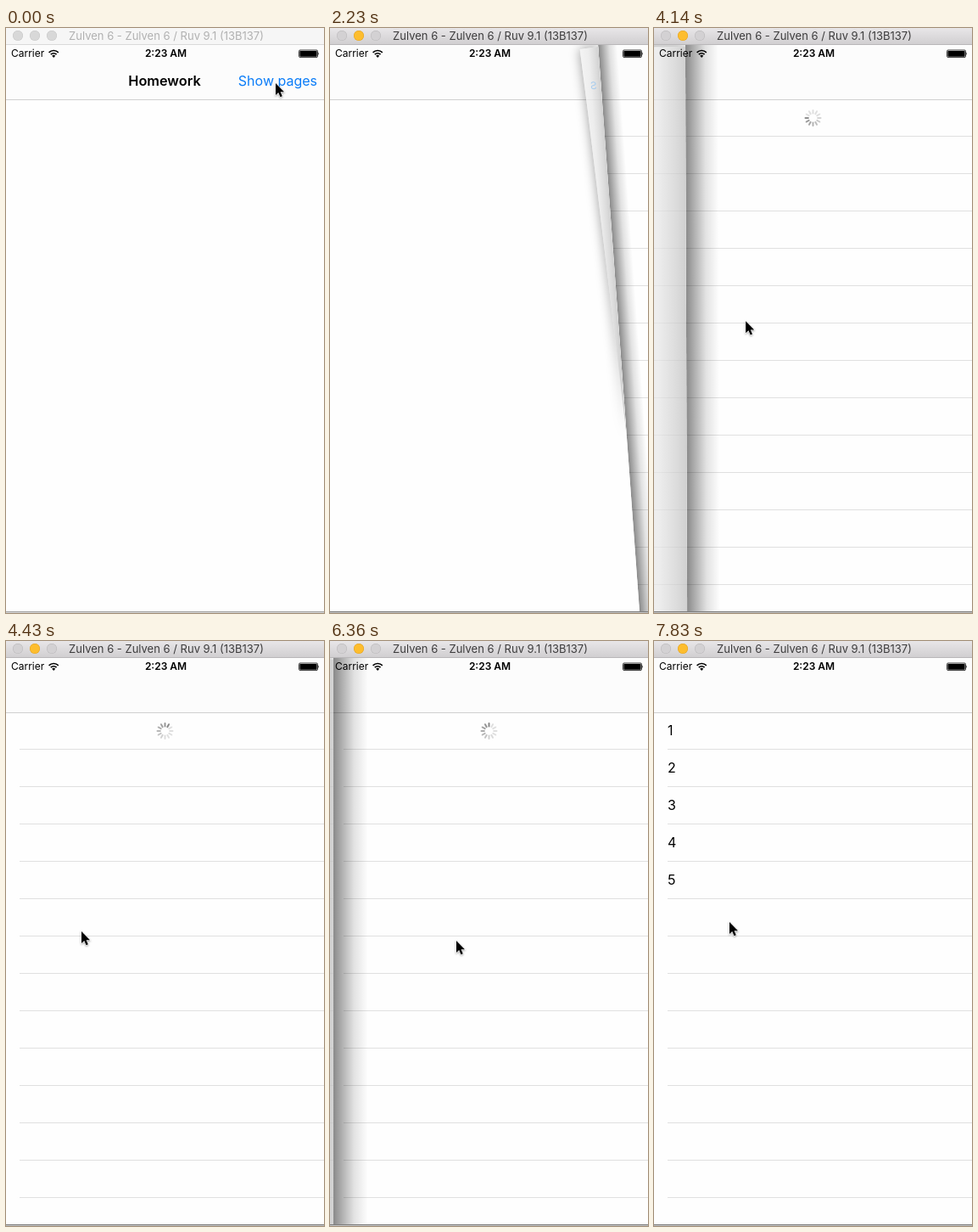
An HTML page with a canvas for the animation above (8 s loop, 375 by 689 pixels).

```html
<!DOCTYPE html>
<html lang="en">
<head>
<meta charset="utf-8">
<title>Homework pages</title>
<style>
html, body { margin: 0; width: 100%; height: 100%; overflow: hidden; background: #fdfdfd; }
body { position: relative; font-family: Inter, "Open Sans", sans-serif; color: #000; }
#stage { position: absolute; left: 0; top: 0; width: 375px; height: 689px; overflow: hidden; }
canvas, #cursor { position: absolute; left: 0; top: 0; }
canvas { width: 375px; height: 689px; }
#bar { position: absolute; left: 0; top: 0; width: 375px; height: 19px; background: #f6f6f6;
  border-bottom: 1px solid #dadada; color: #b1b1b1; font-size: 13px; line-height: 19px; }
#bar span { position: absolute; left: 0; width: 378px; text-align: center; white-space: pre; }
#bar i { position: absolute; top: 3px; width: 12px; height: 12px; border-radius: 50%;
  background: #d8d8d8; box-shadow: inset 0 0 0 .5px #c6c6c6; }
#bar.on { background: linear-gradient(#e8e6e8, #d1cfd1); border-color: #b9b7b9; color: #3d3c3d; }
#bar.on i { background: #d3d1d3; box-shadow: inset 0 0 0 .5px #b9b7b9; }
#bar.on i.mid { background: #fdbd2e; box-shadow: inset 0 0 0 .5px #dfa023; }
#nav { position: absolute; left: 0; top: 20px; width: 375px; height: 64px; overflow: hidden; line-height: 20px; }
#nav b, #nav span { position: absolute; top: 32px; white-space: nowrap; }
#nav b { left: 0; width: 374px; text-align: center; font-size: 16.3px; font-weight: 600; }
#nav span { right: 8px; font-size: 16px; color: #0a7cf8; }
#status { position: absolute; left: 0; top: 20px; width: 375px; height: 20px; font-size: 12px; line-height: 20px; }
#status span { position: absolute; left: 6px; }
#status b { position: absolute; left: 0; width: 377px; text-align: center; font-weight: 600; }
#status svg { position: absolute; left: 0; top: 0; }
</style>
</head>
<body>
<div id="stage">
  <canvas id="view"></canvas>
  <div id="nav"><b>Homework</b><span>Show pages</span></div>
  <div id="status">
    <span>Carrier</span><b>2:23 AM</b>
    <svg width="375" height="20">
      <g fill="none" stroke="#000" stroke-width="1.7">
        <path d="M50.6 8.8a8 8 0 0 1 11.2 0M52.8 11.2a4.9 4.9 0 0 1 6.8 0"/>
      </g>
      <path d="M56.2 15l-2-2.2a2.9 2.9 0 0 1 4 0z"/>
      <rect x="345.5" y="6" width="22" height="8.6" rx="1.4" fill="none" stroke="#000" stroke-width=".8"/>
      <rect x="346.4" y="6.9" width="20.2" height="6.8" rx=".6"/>
      <path d="M368.4 8.6q1.4 1.6 0 3.4z"/>
    </svg>
  </div>
  <div id="bar"><i style="left:8px"></i><i class="mid" style="left:28px"></i><i style="left:48px"></i>
    <span>Zulven 6 - Zulven 6 / Ruv 9.1 (13B137)</span></div>
  <svg id="cursor" width="18" height="22" viewBox="-2 -2 18 22" style="filter:drop-shadow(0 1px 1px rgba(0,0,0,.35))">
    <path d="M0 0V14L3.2 11L5.5 16.2L7.8 15.2L5.6 10.2H10z" fill="#000" stroke="#fff" stroke-width="1.1" paint-order="stroke"/>
  </svg>
</div>
<script>
const LOOP = 8000, W = 375, TOP = 20, NAV = 84, END = 687, ROW = 44;
const $ = id => document.getElementById(id);
const canvas = $('view'), ctx = canvas.getContext('2d');
const scale = window.devicePixelRatio || 1;
canvas.width = W * scale;
canvas.height = 689 * scale;

const clamp = (v, a = 0, b = 1) => Math.min(b, Math.max(a, v));
const easeOut = u => 1 - (1 - clamp(u)) ** 2;

// time, tip x, tip y
const pointer = [
  [0, 318, 65], [2080, 318, 65], [2600, 312, 300], [3100, 307, 376], [3254, 307, 376], [3400, 300, 374],
  [3850, 170, 352], [4150, 105, 345], [4425, 89, 342], [4700, 92, 343],
  [5250, 285, 361], [5500, 297, 363], [5640, 297, 363], [5800, 288, 362],
  [6100, 190, 356], [6337, 149, 353], [6650, 118, 361], [7200, 92, 338], [7600, 89, 331]
];

// time, fold x at the top, fold x at the bottom
const curls = [
  [[2060, 375, 376], [2080, 362, 375], [2227, 316, 365], [2400, 240, 310], [2600, 120, 190], [2800, 40, 70], [2960, -20, 0], [3080, -70, -60]],
  [[3390, 375, 375], [3550, 330, 338], [3850, 170, 176], [4150, 30, 32], [4300, -50, -50]],
  [[5650, 375, 375], [5790, 340, 344], [6050, 190, 194], [6337, 4, 4], [6480, -60, -60]]
];

const pages = [
  { blank: true },
  { count: 0, load: Infinity },
  { count: 2, load: 5366 },
  { count: 5, load: 7440 }
];

function at(track, t) {
  if (t <= track[0][0]) return track[0].slice(1);
  for (let i = 1; i < track.length; i++) {
    const a = track[i - 1], b = track[i];
    if (t < b[0]) {
      const u = (t - a[0]) / (b[0] - a[0]);
      return [1, 2].map(k => a[k] + (b[k] - a[k]) * u);
    }
  }
  return track[track.length - 1].slice(1);
}

function tick(t) {
  if (t < 900) return 0;
  if (t < 2080) return 900 + 147 * Math.min(5, Math.floor((t - 900) / 147));
  return 2080 + 146.8 * Math.min(39, Math.floor((t - 2080) / 146.8));
}

function box(x, y, w, h, fill) {
  ctx.fillStyle = fill;
  ctx.fillRect(x, y, w, h);
}

const line = (y, h = 1) => box(16, Math.round(y), W - 16, h, '#e0e0e0');

function spinner(y, t) {
  ctx.save();
  ctx.translate(187.5, y);
  ctx.lineWidth = 2;
  ctx.lineCap = 'round';
  const head = t * 0.36 - 118;
  for (let i = 0; i < 12; i++) {
    const behind = (((head - i * 30) % 360) + 360) % 360 / 360;
    const a = i * Math.PI / 6, s = Math.sin(a), c = -Math.cos(a);
    const g = Math.round(135 + 88 * Math.min(1, behind * 1.6));
    ctx.strokeStyle = `rgb(${g},${g},${g})`;
    ctx.beginPath();
    ctx.moveTo(s * 5.6, c * 5.6);
    ctx.lineTo(s * 9, c * 9);
    ctx.stroke();
  }
  ctx.restore();
}

function header(y = TOP) {
  box(0, y, W, 64, '#fcfcfc');
  box(0, y + 64, W, 1, '#cfcfcf');
}

function page(p, t) {
  box(0, TOP, W, END - TOP, '#fefefe');
  if (!p.blank) {
    const s = easeOut((t - p.load) / 350);
    const moving = s > 0 && s < 1;
    const shift = (p.count + 1) * ROW * s;
    const cover = moving ? NAV + shift + 4 : 0;
    for (let y = 127; y < END; y += ROW) if (y > cover) line(y);
    if (s > 0) {
      ctx.font = '16px Inter, "Open Sans", sans-serif';
      ctx.globalAlpha = s > 0.8 ? 1 : s;
      for (let i = 1; i <= p.count; i++) {
        const y = Math.round(83 + ROW * i * s);
        line(y);
        ctx.fillStyle = '#000';
        ctx.fillText(i, 16, y - 16);
      }
      ctx.globalAlpha = 1;
    }
    if (moving) {
      box(0, Math.round(cover) - 1, W, 2, '#dedede');
      line(127 + shift);
    }
    if (s < 1) spinner(106 + shift, t);
  }
  header();
}

function path(points) {
  ctx.beginPath();
  points.forEach(([x, y]) => ctx.lineTo(x, y));
  ctx.closePath();
}

function fade(x0, x1, stops) {
  const g = ctx.createLinearGradient(x0, 0, x1, 0);
  stops.forEach(([o, c]) => g.addColorStop(o, c));
  return g;
}

const shade = a => `rgba(0,0,0,${a})`;

function backWidth(fold) {
  const d = W - fold;
  return Math.max(0, (d - 25) * (0.58 + 0.37 * clamp(d / W)));
}

function curl(front, under, [a, b], t) {
  const slope = (b - a) / (END - TOP);
  const foldAt = y => a + (y - TOP) * slope;
  page(under, t);

  // cast shadow, sheared along the fold
  const reach = 19 + 22 * clamp((W - a) / W);
  ctx.save();
  ctx.transform(1, 0, slope, 1, a - TOP * slope, 0);
  box(0, TOP, reach, END - TOP, fade(0, reach,
    [[0, shade(0.46)], [0.25, shade(0.31)], [0.6, shade(0.11)], [1, shade(0)]]));
  ctx.restore();

  // flat part of the turning sheet
  ctx.save();
  path([[-400, TOP], [a, TOP], [b, END], [-400, END]]);
  ctx.clip();
  page(front, t);

  // its folded back
  const top = TOP + 3;
  const meet = b > 350 && slope > 0 ? TOP + (350 - a) / slope : END;
  const edge = [[foldAt(top) - backWidth(a), top + 2]];
  for (let i = 1; i <= 6; i++) {
    const y = top + (meet - top) * i / 6;
    edge.push([foldAt(y) - backWidth(foldAt(y)), y]);
  }
  if (backWidth(a) > 0) {
    path([[foldAt(top), top - 1], ...edge, [foldAt(meet), meet]]);
    ctx.save();
    ctx.shadowColor = shade(0.4);
    ctx.shadowBlur = 13 * scale;
    ctx.fillStyle = '#ececec';
    ctx.fill();
    ctx.restore();
    ctx.save();
    ctx.clip();
    ctx.transform(1, 0, slope, 1, a - TOP * slope, 0);
    const w = backWidth(a);
    box(-w - 60, TOP, w + 60, END, fade(-Math.min(w, 60), 0,
      [[0, '#f4f4f4'], [0.45, '#ededed'], [0.8, '#dcdcdc'], [1, '#d0d0d0']]));
    box(-w, NAV, w, 1, shade(0.05));
    if (front.blank) {
      ctx.scale(-1, 1);
      ctx.font = '12px Inter, sans-serif';
      ctx.fillStyle = '#a9cdee';
      ctx.fillText('S', 5, 72);
    } else {
      for (let y = 127; y < END; y += ROW) box(-w, y, w, 1, shade(0.04));
    }
    ctx.restore();
  }
  ctx.restore();
}

function draw(t) {
  const active = t >= 900;
  ctx.setTransform(scale, 0, 0, scale, 0, 0);
  box(0, 0, W, 689, '#fdfdfd');

  const turn = curls.findIndex(c => t >= c[0][0] && t < c[c.length - 1][0]);
  if (turn >= 0) {
    curl(pages[turn], pages[turn + 1], at(curls[turn], t), t);
  } else {
    page(pages[curls.filter(c => t >= c[0][0]).length], t);
  }

  // blank sheet rising over the first screen
  const sheet = END - (END - TOP) * easeOut((t - 960) / 600);
  if (active && sheet > TOP && sheet < END) {
    box(0, sheet, W, END - sheet, '#fefefe');
    header(sheet);
  }
  $('nav').style.height = clamp(sheet - TOP, 0, 64) + 'px';

  box(0, 687, W, 1, active ? '#7c7c7c' : '#a2a2a2');
  box(0, 688, W, 1, active ? '#c2c2c2' : '#d4d4d4');
  $('bar').className = active ? 'on' : '';

  const [x, y] = at(pointer, t);
  const cur = $('cursor').style;
  cur.transform = `translate(${x - 2}px, ${y - 2}px)`;
  cur.visibility = t > 2150 && t < 2600 ? 'hidden' : 'visible';
}

const start = performance.now();
function frame() {
  draw(tick((performance.now() - start) % LOOP));
  requestAnimationFrame(frame);
}
frame();
</script>
</body>
</html>
```
